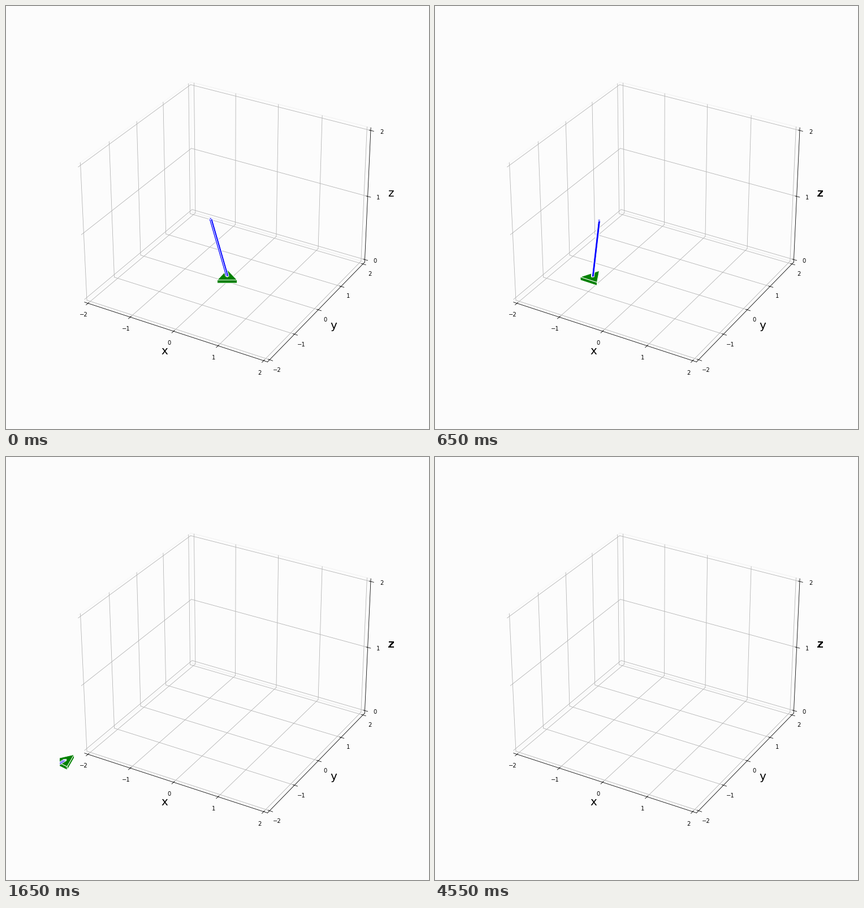
Animation of 748x748 px, one loop 5 s. Source, as a matplotlib script:

```python
import numpy as np
import matplotlib.pyplot as plt
from matplotlib.animation import FuncAnimation
from mpl_toolkits.mplot3d.art3d import Poly3DCollection

SIZE, DPI = 748, 72
FRAMES, STEP = 100, 50
LAST_VISIBLE = 38
BACK = "#fcfcfc"

# Motion keys: frame, right, away, height, yaw (degrees), pole right, away, up.
# "Right" and "away" are ground directions as seen by the camera.
KEYS = np.array([
    (0, 0, 0, 0, 0, -.33, -.10, .938),
    (8, -.46, -.015, 0, 8, -.18, -.12, .975),
    (11, -.82, -.01, 0, -14, -.02, -.17, .985),
    (13, -1.289, -.01, 0, -31, .16, -.22, .962),
    (19, -2.388, -.375, 0, -30, .68, -.12, .725),
    (22, -2.99, -.69, 0, -32, .85, 0, .45),
    (25, -3.30, -.90, 0, -35, .90, .30, .10),
    (28, -3.65, -1.00, 0, -38, .05, .90, -.40),
    (30, -3.65, -1.10, 0, -39, -.30, .90, -.10),
    (33, -3.19, -1.22, 0, -40, -.80, -.50, -.20),
    (34, -3.30, -1.35, 0, -45, .10, .55, -.80),
    (36, -4.20, -1.50, .8, -50, -.30, .30, .90),
    (38, -3.40, -1.50, 1.99, -55, .33, 0, .94),
])
TIMES, POSES = KEYS[:, 0], KEYS[:, 1:]
SLOPES = np.gradient(POSES, TIMES, axis=0)
SLOPES[0] = 0

BODY = np.array([.25j, -.2 - .15j, .2 - .15j])
BODY_HEIGHT = .05
POLE_SECTION = .032 * np.array([1, 1j, -1, -1j])


def pose_at(t):
    """Cubic Hermite interpolation of the motion keys."""
    i = min(np.searchsorted(TIMES, t, side="right") - 1, len(TIMES) - 2)
    h = TIMES[i + 1] - TIMES[i]
    s = (t - TIMES[i]) / h
    return ((1 + 2 * s) * (1 - s) ** 2 * POSES[i]
            + s * (1 - s) ** 2 * h * SLOPES[i]
            + s * s * (3 - 2 * s) * POSES[i + 1]
            + s * s * (s - 1) * h * SLOPES[i + 1])


def to_world(ground, z):
    """Turn camera-aligned complex ground points into x, y, z rows."""
    p = np.asarray(ground) * np.exp(1j * np.pi / 6)
    return np.column_stack([p.real, p.imag, np.broadcast_to(z, p.shape)])


def prism(bottom, top):
    n = len(bottom)
    sides = [[bottom[i], bottom[(i + 1) % n], top[(i + 1) % n], top[i]]
             for i in range(n)]
    return [list(bottom), list(top)] + sides


def build(t):
    right, away, height, yaw, *lean = pose_at(t)
    lean = np.array(lean) / np.linalg.norm(lean)
    centre = right + 1j * away
    turn = np.exp(1j * np.radians(yaw))
    deck = height + BODY_HEIGHT
    body = centre + BODY * turn
    foot = centre + POLE_SECTION * turn
    tip = foot + lean[0] + 1j * lean[1]
    return (prism(to_world(body, height), to_world(body, deck)),
            prism(to_world(foot, deck), to_world(tip, deck + lean[2])))


plt.rcParams["axes3d.automargin"] = True
fig = plt.figure(figsize=(SIZE / DPI, SIZE / DPI), dpi=DPI, facecolor=BACK)
ax = fig.add_subplot(projection="3d", computed_zorder=False, facecolor=BACK)
ax.set_xlim(-2, 2)
ax.set_ylim(-2, 2)
ax.set_zlim(0, 2)
ax.set_xticks(range(-2, 3))
ax.set_yticks(range(-2, 3))
ax.set_zticks(range(3))
ax.set_xlabel("x", fontsize=20)
ax.set_ylabel("y", fontsize=20)
ax.set_zlabel("z", fontsize=20)
for axis in (ax.xaxis, ax.yaxis, ax.zaxis):
    axis.pane.fill = False

parts = []
for order, (color, faces) in enumerate(zip(("green", "blue"), build(0))):
    part = Poly3DCollection(faces, facecolors=color, edgecolors="white",
                            linewidths=1, zorder=3 + order)
    ax.add_collection3d(part)
    parts.append(part)

# The z label is painted once more on every frame, so its edges grow heavier.
fig.canvas.draw()
zx, zy = ax.zaxis.label.get_position()
repaints = [ax.text2D(zx, zy, "z", transform=ax.transData, fontsize=20,
                      ha="center", va="center", rotation_mode="anchor",
                      visible=False)
            for _ in range(FRAMES - 1)]


def update(frame):
    shown = frame <= LAST_VISIBLE
    for part, faces in zip(parts, build(min(frame, LAST_VISIBLE))):
        part.set_verts(faces)
        part.set_visible(shown)
    for i, text in enumerate(repaints):
        text.set_visible(i < frame)
    return parts + repaints


anim = FuncAnimation(fig, update, frames=FRAMES, interval=STEP,
                     repeat=True, repeat_delay=0, blit=False)
plt.show()
```
